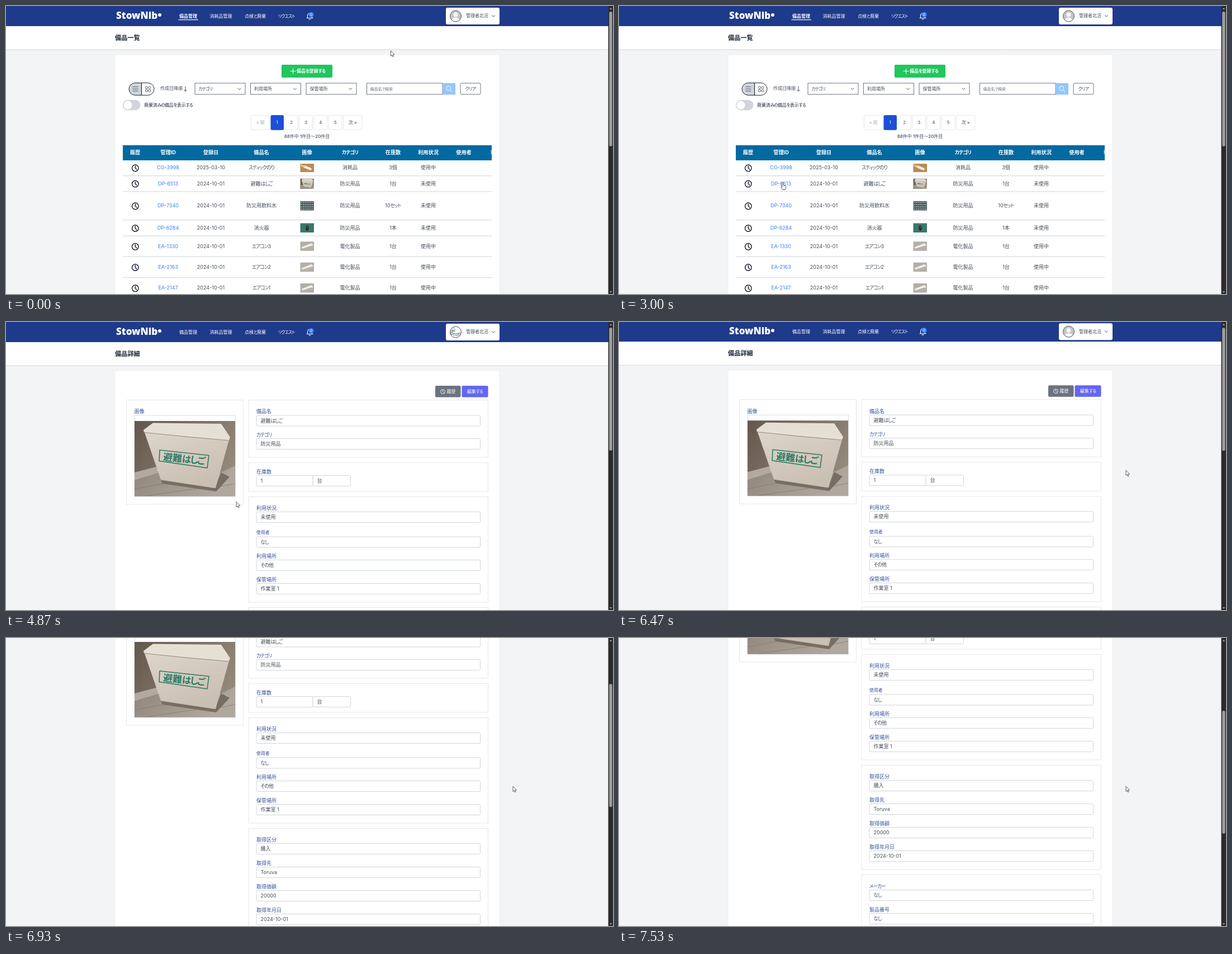
Recreate the animation shown at these times as an HTML page. Size 1086x515 px, loop 8000 ms.

```html
<!DOCTYPE html>
<html lang="ja">
<head>
<meta charset="utf-8">
<title>備品管理</title>
<style>
html, body { margin: 0; width: 1086px; height: 515px; overflow: hidden; background: #f3f4f6; }
svg { display: block; }
text { font-family: Inter, "Noto Sans CJK JP", "Noto Sans CJK", sans-serif; font-feature-settings: "palt"; white-space: pre; }
.k { font-size: .96em; letter-spacing: -.1em; }
.logo { font-family: "Open Sans", sans-serif; }
</style>
</head>
<body>
<svg id="stage" width="1086" height="515" viewBox="0 0 1086 515"></svg>
<script>
const LOOP = 8000, STEP = 1000 / 15;
const INK = '#434c5a', LINE = '#e5e7eb', NAVY = '#1e3a8a', LABEL = '#36509a';

// Drawing helpers; text is centred vertically on y, kana are set tight
const rect = (x, y, x2, y2, fill, stroke = 'none', r = 0, w = 1) =>
  `<rect x="${x}" y="${y}" width="${x2 - x}" height="${y2 - y}" rx="${r}" fill="${fill}" stroke="${stroke}" stroke-width="${w}"/>`;
const path = (d, stroke, w = 1, fill = 'none') =>
  `<path d="${d}" fill="${fill}" stroke="${stroke}" stroke-width="${w}" stroke-linecap="round" stroke-linejoin="round"/>`;
const shape = (d, fill) => `<path d="${d}" fill="${fill}"/>`;
const disc = (x, y, r, fill, stroke = 'none', w = 1) =>
  `<circle cx="${x}" cy="${y}" r="${r}" fill="${fill}" stroke="${stroke}" stroke-width="${w}"/>`;
const group = (s, x, y, k = 1) => `<g transform="translate(${x} ${y}) scale(${k})">${s}</g>`;
const kana = s => s.replace(/[\u3041-\u30ff]+/g, m => `<tspan class="k">${m}</tspan>`);
const text = (x, y, s, size, fill = INK, weight = 400, anchor = 'start') =>
  `<text x="${x}" y="${y + size * .37}" font-size="${size}" fill="${fill}" font-weight="${weight}" text-anchor="${anchor}">${kana(s)}</text>`;
const mid = (x, y, s, size, fill, weight) => text(x, y, s, size, fill, weight, 'middle');
const chevron = (x, y) => path(`M${x - 2.6} ${y - 1.3}l2.6 2.6 2.6-2.6`, INK);
const clock = (x, y, r, c, w) =>
  disc(x, y, r, 'none', c, w) + path(`M${x} ${y - r * .6}V${y}l${r * .42} ${r * .42}`, c, w);

// Pictures, reduced to flat shapes
const ladderBox =
  rect(0, 0, 180, 134.5, 'url(#wall)') +
  shape('M0 92L46 80V92L0 106Z', '#b3a99d') +
  shape('M0 106L46 92H155L180 80V134.500H0Z', 'url(#floor)') +
  path('M0 122L52 112M20 134L110 121M148 118L180 112', '#857b70', .8) +
  shape('M47 106L143 120 155 92 170 100 146 126 50 112Z', '#786d62') +
  shape('M17 18L169 34 145 120 47 105Z', 'url(#front)') +
  shape('M16 16L33 3.500 155 5 171 29 169 34.500 17 20Z', '#e6dfd6') +
  path('M18 20.500Q95 29 168 34.800', '#978b7e', 1) +
  path('M45 52L133 61.500 130 84 44 71.500Z', '#2a7a62', 1.6) +
  `<g transform="rotate(6 88 67.500)">${mid(88, 67.5, '避難はしご', 17, '#2a7a62', 700)}</g>`;
const glue = rect(0, 0, 24.5, 15, '#bd8a52') +
  path('M7 5L18 9.500', '#f3efe9', 4.5) + path('M2 3L7 5', '#dfc29c', 3);
let bottles = rect(0, 0, 24.5, 16.5, '#47575a');
for (let i = 0; i < 28; i++) bottles += disc(2 + i % 7 * 3.4, 2.2 + (i / 7 | 0) * 4, 1.1, '#a9b8b6');
const extinguisher = rect(0, 0, 24.5, 16.5, '#39796a') +
  '<ellipse cx="12.500" cy="8.500" rx="2.800" ry="4.800" fill="#37272a"/>' + disc(12.5, 7, 1, '#a5675f');
const aircon = rect(0, 0, 24.5, 16.5, '#b3aea6') +
  shape('M2 10L20 3 23 6 21 9 5 14Z', '#efeeea') + path('M5 13L21 8', '#77736d', .9);

const header = (title, active) =>
  rect(0, 0, 1078, 36, NAVY) + rect(0, 36, 1078, 78, '#fff') + rect(0, 77.5, 1078, 78.7, '#d9dbdf') +
  '<text class="logo" x="197" y="22.500" font-size="17" font-weight="800" fill="#fff">StowNib</text>' +
  disc(275, 16, 3, '#fff') +
  [[310, '備品管理'], [364.5, '消耗品管理'], [427, '点検と廃棄'], [487, 'リクエスト']]
    .map(([x, s], i) => text(x, 18, s, 8, '#fff', active && !i ? 700 : 500)).join('') +
  (active ? rect(308.5, 24, 344, 25.2, '#fff') : '') +
  path('M538 21.500H549M539.500 21V17a4 4 0 0 1 8 0V21M542 23.700h3', '#fff', 1.1) +
  disc(546, 15.6, 4.6, '#3b82f6') + mid(546, 15.5, '0', 6, '#fff') +
  rect(787, 3, 883, 33, '#fff', 'none', 3) +
  text(823, 17.5, '管理者北沼', 8, INK, 500) + chevron(872, 18) +
  text(195, 57, title, 11.2, '#1f2937', 600) +
  rect(195, 87, 883, 1400, '#fff', LINE, 4, .5);

const avatar = '<g clip-path="url(#face)">' + disc(804.5, 18, 10, '#c4c4c4') + disc(804.5, 15.5, 4, '#f6f6f6') +
  '<ellipse cx="804.500" cy="27" rx="7.500" ry="6.500" fill="#f6f6f6"/></g>' + disc(804.5, 18, 10, 'none', '#4b5563');
const brokenAvatar = '<g clip-path="url(#face)">' +
  path('M796 10h5l2.500 2.500V17h-7.500z', '#9ca3af', .8, '#dbeafe') + shape('M796.500 16.500l3-3 3.500 3z', '#5ba45f') +
  text(795, 22, 'Profile', 8.5) + '</g>' + disc(804.5, 18, 10, 'none', '#5b4a5e');

function listPage() {
  let s = header('備品一覧', true) + avatar;
  s += rect(493, 105, 584, 128, '#22c55e', 'none', 2) + path('M509 116.500h9M513.500 112v9', '#fff', 1.1) +
    text(520, 116, '備品を登録する', 8, '#fff', 700);
  s += shape('M243 137.500H231a11 11 0 0 0 0 22H243Z', '#d1d5db') +
    rect(220, 137.5, 265, 159.5, 'none', '#1f2937', 11) + path('M242.500 137.500v22', '#1f2937', 1.2) +
    path('M227 144.500h9M227 148.300h9M227 152h9', INK, .9);
  for (const x of [249.5, 255]) for (const y of [144, 149.5]) s += rect(x, y, x + 3.8, y + 3.8, 'none', INK, 1.3, .9);
  s += text(276, 147.5, '作成日降順', 8) + path('M321 144v8.500M318.700 150l2.300 2.500 2.300-2.500', INK);
  [[338, 'カテゴリ'], [437.5, '利用場所'], [537, '保管場所']].forEach(([x, t]) =>
    s += rect(x, 138, x + 90, 158, '#fff', '#6b7280') + text(x + 6.5, 148, t, 8) + chevron(x + 79.5, 148.3));
  s += rect(645.5, 138, 781, 158, '#fff', '#6b7280') + text(651.5, 148.5, '備品名で検索', 7, '#6b7280') +
    rect(781, 138, 804, 158.5, '#93c5fd') + disc(791.7, 147.2, 4, 'none', '#fff') + path('M794.700 150.200l3 3', '#fff') +
    rect(813, 138, 849, 158, '#fff', '#6b7280', 2) + mid(831, 148, 'クリア', 8.5);
  s += rect(209, 168, 240.5, 186.5, '#d1d5db', 'none', 9.2) + disc(218, 177.3, 7.5, '#fff') +
    text(247, 177, '廃棄済みの備品を表示する', 7.9, '#1f2937', 500);
  [[438.5, 472, '« 前'], [474, 496.5, '1'], [499, 522.5, '2'], [525, 548.5, '3'], [551, 574.5, '4'], [577, 601, '5'], [603.5, 637, '次 »']]
    .forEach(([a, b, t], i) => s += rect(a, 195.7, b, 221.3, i == 1 ? '#1d4ed8' : '#fff', i == 1 ? '#1d4ed8' : LINE, 1.5) +
      mid((a + b) / 2, 208.3, t, 8, i == 1 ? '#fff' : i ? INK : '#9ca3af'));
  s += mid(538.5, 233.5, '88件中 1件目～20件目', 8, INK, 500);

  const cols = [231, 290, 366.5, 457, 538.5, 615.5, 692.5, 755.5, 819];
  s += rect(209, 249, 869, 276, '#0369a1');
  '履歴,管理ID,登録日,備品名,画像,カテゴリ,在庫数,利用状況,使用者'.split(',')
    .forEach((t, i) => s += mid(cols[i], 262, t, 9.2, '#fff', 700));
  s += `<g clip-path="url(#table)">${text(867, 262, '利用場所', 9.2, '#fff', 700)}</g>`;
  const rows = [
    [289, 303.5, 'CO-3998', 'スティックのり', '消耗品', '3個', glue, 282],
    [317.3, 331.7, 'DP-6513', '避難はしご', '防災用品', '1台', group(ladderBox, 0, 0, .136), 308.8],
    [357, 382.5, 'DP-7340', '防災用飲料水', '防災用品', '10セット', bottles, 349],
    [396.7, 411, 'DP-6284', '消火器', '防災用品', '1本', extinguisher, 388.5],
    [429.5, 448, 'EA-1330', 'エアコン3', '電化製品', '1台', aircon, 421.3],
    [466.7, 485.5, 'EA-2163', 'エアコン2', '電化製品', '1台', aircon, 458.7],
    [504, 523, 'EA-2147', 'エアコン1', '電化製品', '1台', aircon, 496]
  ];
  rows.forEach(([y, end, id, name, kind, count, pic, top], i) => {
    s += rect(209, end - .5, 869, end + .7, '#d8dade') + clock(231.3, y + .8, 5.8, '#111827', 1.4);
    const date = i ? '2024-10-01' : '2025-03-10';
    const state = kind == '防災用品' ? '未使用' : '使用中';
    [id, date, name, '', kind, count, state].forEach((t, c) => s += mid(cols[c + 1], y, t, 9, c ? INK : '#3b82f6'));
    s += group(pic, 526.5, top);
  });
  return s;
}

function detailPage() {
  let s = header('備品詳細', false) + `<g id="ok">${avatar}</g><g id="broken">${brokenAvatar}</g>`;
  s += rect(768, 114, 813.5, 134.5, '#6b7280', 'none', 2) + clock(781.5, 124.5, 3.9, '#fff', .9) + text(788.5, 124, '履歴', 8, '#fff', 500) +
    rect(815.5, 114, 862.5, 134.5, '#6366f1', 'none', 2) + mid(839, 124, '編集する', 8, '#fff', 500);
  s += rect(215.5, 139.5, 424.5, 326, '#fff', LINE) + text(229.5, 160, '画像', 9, LABEL) +
    rect(230, 167, 410.5, 312, '#fff', '#d1d5db', 0, .8) + group(ladderBox, 230, 177);
  [[139.5, 242], [251.5, 303], [312.5, 501], [510.5, 697], [706, 900]]
    .forEach(([a, b]) => s += rect(434, a, 862.5, b, '#fff', LINE));
  const box = (x, y, x2, t) => rect(x, y, x2, y + 19, '#fff', '#d1d5db', 2) + text(x + 7.5, y + 9.3, t, 9);
  [[159.5, '備品名', '避難はしご'], [201, 'カテゴリ', '防災用品'], [332, '利用状況', '未使用'], [375, '使用者', 'なし'],
   [418, '利用場所', 'その他'], [460, '保管場所', '作業室 1'], [530, '取得区分', '購入'], [572, '取得先', 'Toruva'],
   [614, '取得価額', '20000'], [656, '取得年月日', '2024-10-01'], [726, 'メーカー', 'なし'], [768, '製品番号', 'なし']]
    .forEach(([y, label, value]) => {
      const small = label == '使用者';
      s += text(448, y + .6, label, small ? 7.9 : 9, LABEL) + box(448, y + (small ? 9 : 7.5), 848.5, value);
    });
  s += text(448, 267.6, '在庫数', 9, LABEL) + box(448, 274.5, 549, '1') + box(549, 274.5, 616.5, '台');
  return s;
}

const fade = (id, x, y, from, to) =>
  `<linearGradient id="${id}" x2="${x}" y2="${y}"><stop stop-color="${from}"/><stop offset="1" stop-color="${to}"/></linearGradient>`;

const $ = id => document.getElementById(id);
$('stage').innerHTML =
  '<defs>' + fade('wall', 1, .5, '#64584c', '#94887b') + fade('floor', 1, .3, '#8f857a', '#b0a89f') + fade('front', .5, 1, '#ddd5cb', '#cabfb3') +
  `<clipPath id="face"><circle cx="804.500" cy="18" r="10"/></clipPath>
  <clipPath id="table"><rect x="209" y="249" width="660" height="27"/></clipPath></defs>` +
  rect(0, 0, 1086, 515, '#f3f4f6') +
  `<g id="list">${listPage()}</g><g id="detail">${detailPage()}</g>` +
  '<rect id="bar" height="2" fill="#4b5563"/>' +
  `<g id="status">${rect(-3, 504, 92, 518, '#3c3c3c', '#555', 2, .6)}${text(3, 509.5, 'https://stownib.example/items/87', 5.5, '#e3e3e3')}</g>` +
  rect(1077.5, 0, 1086, 515, '#2b2b2b') +
  shape('M1079.800 6l2.200-3 2.200 3zM1079.800 510l2.200 3 2.200-3z', '#9f9f9f') +
  '<rect id="thumb" x="1079.200" width="5.400" rx="2.700" fill="#9f9f9f"/>' +
  `<g id="cursor"><g id="arrow">${path('M0 0V9L2.100 7.100 3.500 10.300 4.900 9.700 3.600 6.500H6.300Z', '#222', .7, '#fff')}</g>` +
  `<g id="hand">${path('M-1.200 8V1a1.200 1.200 0 0 1 2.400 0V5l3.200.8q1.400.4 1.200 2L4.600 13H0L-3 9q-.6-1.200.3-1.600z', '#222', .8, '#fff')}</g></g>`;

const ramp = (t, a, b) => Math.min(1, Math.max(0, (t - a) / (b - a)));
const ease = (t, a, b) => { const p = ramp(t, a, b); return p * p * (3 - 2 * p); };

// Slow legs as [start, end, dx, dy], then the quick sweep as [time, x, y]
const legs = [[200, 333, -2, 0], [533, 867, -2, 0], [1560, 2400, -282, 203], [2420, 2933, -109.5, 32]];
const sweep = [[4667, 292.5, 315], [4800, 335, 318], [4867, 412.5, 322], [4933, 651, 327], [5000, 860, 315],
  [5067, 985, 298], [5200, 1050, 284], [5333, 955, 272], [5467, 907, 265.5]];
function pointer(t) {
  if (t < sweep[0][0])
    return legs.reduce(([x, y], [a, b, dx, dy]) => { const p = ease(t, a, b); return [x + dx * p, y + dy * p]; }, [688.5, 80.5]);
  const i = sweep.findIndex(k => k[0] > t);
  if (i < 0) return sweep[sweep.length - 1].slice(1);
  const [a, ax, ay] = sweep[i - 1], [b, bx, by] = sweep[i], p = ramp(t, a, b);
  return [ax + (bx - ax) * p, ay + (by - ay) * p];
}

const OPEN = 4400;
const show = (id, on) => $(id).setAttribute('display', on ? 'inline' : 'none');

function draw(ms) {
  const t = Math.floor((ms + 7) / STEP) * STEP;
  const opened = t > OPEN - 5;
  const scroll = 170 * ease(t, 6447, 6933) + 113 * ease(t, 7115, 7533);
  show('list', !opened);
  show('detail', opened);
  $('detail').setAttribute('transform', `translate(0 ${-scroll})`);
  show('ok', t > 5100);
  show('broken', t <= 5100);
  $('thumb').setAttribute('y', 10 + scroll * .424);
  $('thumb').setAttribute('height', opened ? 220 : 241);

  const load = .08 * ease(t, 3690, 3933) + .1 * ease(t, 4090, 4333) + .82 * ease(t, OPEN - 20, 4600);
  $('bar').setAttribute('width', 1078 * load);
  $('bar').setAttribute('opacity', 1 - ramp(t, 4600, 4800));
  $('status').setAttribute('opacity', opened ? 0 : ramp(t, 3067, 3333));

  const [x, y] = pointer(t);
  $('cursor').setAttribute('transform', `translate(${x} ${y})`);
  const link = t > 2850 && !opened;
  show('hand', link);
  show('arrow', !link);
}

const begin = performance.now();
function tick() {
  draw((performance.now() - begin) % LOOP);
  requestAnimationFrame(tick);
}
draw(0);
requestAnimationFrame(tick);
</script>
</body>
</html>
```
